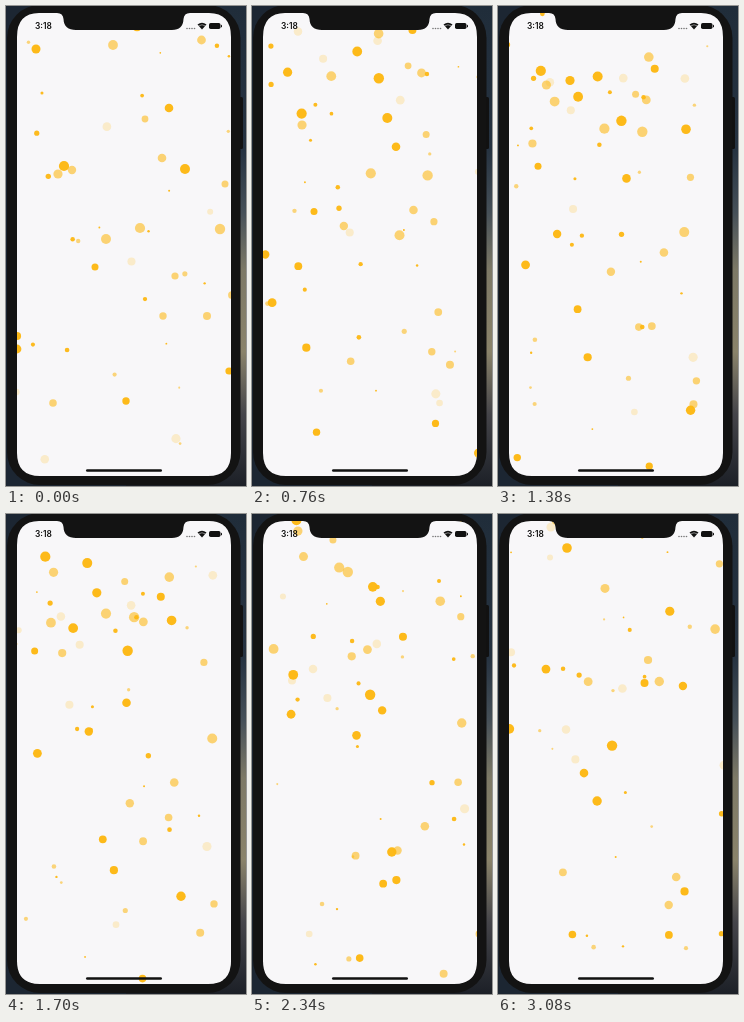
An HTML page that plays this animation: 240x480 px, repeating every 3100 ms.

```html
<!DOCTYPE html>
<html lang="en">
<head>
<meta charset="utf-8">
<title>Drifting dots</title>
<style>
  html, body { margin: 0; width: 100%; height: 100%; overflow: hidden; background: #15181d; }
  svg { display: block; width: 240px; height: 480px; }
  text { font: 600 8.4px Inter, "Liberation Sans", sans-serif; }
</style>
</head>
<body>
<svg viewBox="0 0 240 480">
  <defs>
    <linearGradient id="wall" x2="0" y2="1">
      <stop offset="0" stop-color="#202d3a"/>
      <stop offset=".3" stop-color="#263341"/>
      <stop offset=".43" stop-color="#465058"/>
      <stop offset=".55" stop-color="#7d7966"/>
      <stop offset=".72" stop-color="#8a836a"/>
      <stop offset=".85" stop-color="#45454a"/>
      <stop offset="1" stop-color="#1c2027"/>
    </linearGradient>
    <clipPath id="screen">
      <path d="M33 7H51Q57 7 57.500 13Q58 24 70 24H166Q177 24 177.500 13Q178 7 184 7H203Q225 7 225 31V447Q225 470 202 470H34Q11 470 11 447V31Q11 7 33 7Z"/>
    </clipPath>
  </defs>
  <rect width="240" height="480" fill="#1c2632"/>
  <rect x="120" width="120" height="480" fill="url(#wall)"/>
  <rect x="232" y="91" width="5" height="52" rx="1.500" fill="#111"/>
  <rect x="1" y="-1" width="233.500" height="480" rx="33" fill="#131313"/>
  <g clip-path="url(#screen)">
    <rect width="240" height="480" fill="#f8f7f9"/>
    <g id="dots" fill="#fdb813"></g>
  </g>
  <g fill="#111">
    <text x="29" y="23">3:18</text>
    <g fill="#777">
      <circle cx="181" cy="22.500" r=".8"/><circle cx="183.500" cy="22.500" r=".8"/>
      <circle cx="186" cy="22.500" r=".8"/><circle cx="188.500" cy="22.500" r=".8"/>
    </g>
    <path d="M191.500 18.500Q196 15 200.500 18.500L196 23.500Z"/>
    <path d="M192.500 20Q196 17.500 199.500 20" fill="none" stroke="#f8f7f9" stroke-width=".5"/>
    <rect x="203" y="17" width="11.500" height="6" rx="1.700"/>
    <rect x="215" y="18.800" width="1" height="2.400" rx=".5"/>
    <rect x="80" y="463.200" width="76" height="2.600" rx="1.300"/>
  </g>
</svg>
<script>
const LOOP = 3100, STEP = 20, SOLID = 18, SMALL = 36;

// x, y, and velocity per second; solid dots first, each group from large to small
const paths = [
  131,20,-5.5,68.7,  58,160,-11,-69,  179,163,-57.5,-67,  136,-10,-40.5,73,
  284.6,195.7,-70,-52.5,  268.5,499.5,-55,-69,  -9,56,58.7,13.4,  30,43,-36,-30,
  11,343,12,-61,  163,102,-25,51,  -43,273.6,74,-33,  11,330,57,15.4,
  165,-23.5,-6,62.5,  5.5,207.5,53.7,69.3,  213,519,-45,-32,  120,395,-73,41,
  223,365,-52,69,  89,261,-35.5,-73,
  214,223,-50.5,-70.5,  134,222,-20,-72,  100,233,62.5,-5,  107,39,-36.5,41,
  97,-1,39,37.7,  363,340,-65.5,-56,  52,168,-2.6,-64.5,  -124,-58,75,43,
  195.5,34,-34.2,43.4,  156,152,7.2,68.5,  66,164,34,73.7,  -59.4,130.6,68,5,
  201,310,-4,64,  226,289,-52.3,22.5,  47,397,68,-55,  157,310,30,47,
  169,270,17,-71.5,  219,178,-59,-65,  139,113,22.5,-70
];

let seed = 318;
const random = () => (seed = seed * 16807 % 2147483647) / 2147483647;
const wrap = (v, size) => ((v % size) + size) % size;

const layer = document.getElementById("dots");
const dots = [];

function addDot(x, y, vx, vy, r, alpha, wraps) {
  const el = document.createElementNS("http://www.w3.org/2000/svg", "circle");
  el.setAttribute("r", r);
  el.setAttribute("opacity", alpha);
  layer.append(el);
  dots.push({ el, x, y, vx, vy, wraps });
}

// Small and faint dots fill the rest of the screen
for (let i = 0; i < SMALL; i++) {
  const faint = i % 5 === 0;
  const r = faint ? 3 + 1.8 * random() : 0.8 + 1.9 * random();
  const alpha = faint ? 0.2 : i % 3 ? 0.95 : 0.55;
  const angle = random() * 2 * Math.PI, speed = 50 + 35 * random();
  addDot(random() * 240, random() * 490, speed * Math.cos(angle), speed * Math.sin(angle), r, alpha, true);
}

for (let i = 0; i < paths.length / 4; i++) {
  const solid = i < SOLID;
  const rank = solid ? i : i - SOLID;
  addDot(...paths.slice(i * 4, i * 4 + 4), 5.2 - rank * 0.1, solid ? 0.97 : 0.58, false);
}

const start = performance.now();

function draw(now) {
  const ms = Math.max(0, now - start) % LOOP;
  const t = Math.floor(ms / STEP) * STEP / 1000;
  for (const d of dots) {
    const x = d.x + d.vx * t, y = d.y + d.vy * t;
    d.el.setAttribute("cx", d.wraps ? wrap(x, 240) : x);
    d.el.setAttribute("cy", d.wraps ? wrap(y, 490) : y);
  }
  requestAnimationFrame(draw);
}
draw(start);
</script>
</body>
</html>
```
